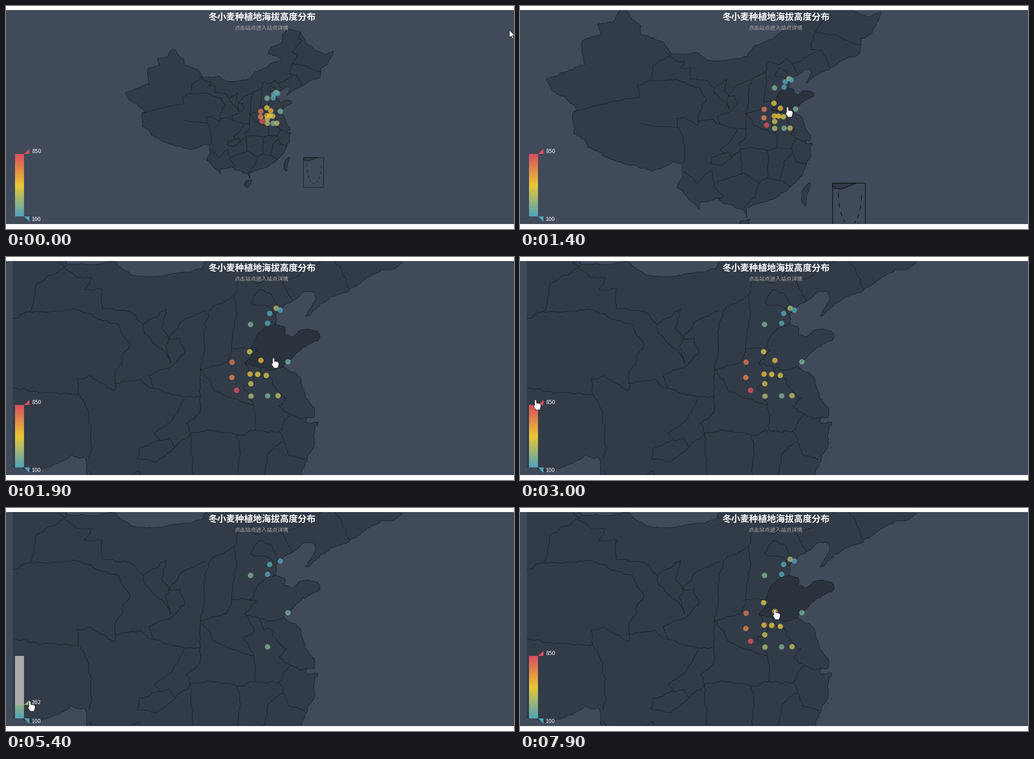
Recreate the animation shown at these times as a matplotlib script. Size 1128x496 px, loop 8 s.

```python
import numpy as np
import matplotlib.pyplot as plt
from matplotlib.animation import FuncAnimation
from matplotlib.collections import LineCollection
from matplotlib.patches import Polygon, Rectangle
from matplotlib.transforms import Affine2D

W, H, DPI = 1128, 496, 100
PX = 72 / DPI
STEP, FRAMES = 100, 80
BG, LAND, HOVER, EDGE = "#404a59", "#323c48", "#2a333d", "#11161c"
FONT = "Noto Sans CJK JP"
rng = np.random.default_rng(5)

# Each wheel notch zooms by 1.1 around the pointer: scale, x shift, y shift
FAR = (1.0, 0.0, 0.0)
HALF = (1.1 ** 2, -126.7, -51.0)
MID = (1.1 ** 5, -368.8, -148.3)
NEAR = (1.1 ** 11, -1111.5, -435.5)
VIEWS = np.array([FAR, HALF, MID, NEAR]).T


def place(view, coords):
    pts = np.reshape(np.array(coords, float), (-1, 2))
    return (pts - view[1:]) / view[0]


def rough(pts, depth=4, share=0.17, cap=1.1):
    """Split every segment again and again, nudging each middle sideways."""
    for _ in range(depth):
        d = np.diff(pts, axis=0)
        size = np.hypot(*d.T)[:, None]
        side = np.c_[-d[:, 1], d[:, 0]] / size
        push = np.minimum(share * size, cap) * rng.uniform(-1, 1, size.shape)
        out = np.empty((2 * len(pts) - 1, 2))
        out[::2], out[1::2] = pts, pts[:-1] + d / 2 + side * push
        pts = out
    return pts


lines = []


def border(view, *coords):
    lines.append(rough(place(view, coords)))
    return lines[-1]


# Outer edge, clockwise from the west
north = border(
    FAR, 265, 193, 283, 186, 318, 173, 314, 155, 315, 140, 341, 131, 336, 118, 357, 115,
    371, 95, 379, 103, 396, 120, 395, 131, 427, 142, 437, 158, 475, 157, 488, 167, 515, 167,
    541, 162, 552, 147, 577, 138, 594, 125, 612, 121, 611, 116, 581, 106, 590, 91, 612, 83,
    614, 63, 628, 51, 652, 56, 671, 86, 690, 100, 712, 107, 727, 101, 714, 130, 699, 138,
    697.5, 156)
bay = border(NEAR, 880, 11, 857, 28, 834, 27, 797, 50, 764, 71, 735, 84, 690, 113, 666, 131,
             688, 92, 684, 77, 660, 78, 598, 129, 598, 148)
sd_coast = border(NEAR, 598, 148, 618, 156, 619, 172, 634, 178, 658, 162, 697, 171, 694, 184,
                  660, 200, 617, 243)
js_coast = border(NEAR, 617, 243, 647, 263, 664, 312, 684, 334, 683, 357, 672, 356)
east = border(NEAR, 672, 356, 664, 366, 692, 367, 684, 392, 684, 420, 668, 455, 655, 487)
south = border(
    MID, 628, 373, 598, 405, 560, 431, 502, 449, 504, 470, 498, 456, 455, 440, 440, 428,
    400, 436, 398, 453, 378, 432, 349, 405, 362, 378, 357, 349, 340, 346, 312, 361, 290, 366,
    250, 354, 212, 345, 183, 330, 150, 313, 143, 297, 119, 283, 117, 240, 130, 232, 95, 200,
    72, 190, 59, 162)

# Provinces that react to the pointer
sd_west = border(NEAR, 598, 148, 572, 160, 540, 205, 557, 208, 530, 236, 563, 247)
sd_south = border(NEAR, 563, 247, 590, 252, 617, 243)
js_west = border(NEAR, 563, 247, 572, 271, 586, 268, 606, 300, 624, 314, 606, 332, 632, 350)
js_south = border(NEAR, 632, 350, 655, 360, 672, 356)

mainland = np.vstack([north, bay, sd_coast, js_coast, east, south])
shandong = np.vstack([sd_coast, sd_south[::-1], sd_west[::-1]])
jiangsu = np.vstack([js_coast, js_south[::-1], js_west[::-1], sd_south])

# West
border(FAR, 437, 159, 413, 174, 408, 195, 391, 202, 394, 218, 302, 238)
border(NEAR, 52, 122, 170, 122, 212, 140, 250, 150, 275, 195, 242, 262, 240, 298, 185, 264,
       158, 272, 160, 304, 132, 302, 75, 304, 15, 290)
border(NEAR, 160, 304, 184, 350, 190, 430, 184, 448)
border(NEAR, 118, 10, 160, 46, 190, 46, 175, 72, 215, 72, 213, 114, 275, 120, 304, 150, 357, 116,
       345, 158, 362, 182, 392, 142, 446, 120)
border(NEAR, 304, 150, 307, 172, 357, 218, 365, 236, 354, 196, 362, 182, 386, 180, 396, 215,
       358, 248, 318, 264, 328, 292)
border(NEAR, 240, 280, 300, 272, 328, 292, 375, 306, 431, 312, 432, 249)

# Centre
border(NEAR, 634, 100, 612, 56, 592, 31, 566, 57, 520, 46, 508, 86, 456, 115, 441, 150, 441, 200,
       432, 249, 488, 236, 500, 204, 540, 205)
border(NEAR, 500, 204, 512, 130, 508, 86)
border(NEAR, 598, 129, 582, 110, 543, 102, 566, 72, 590, 83, 606, 120)
border(NEAR, 530, 236, 552, 274, 526, 290, 550, 328, 554, 386, 606, 388, 632, 350)
border(NEAR, 432, 249, 460, 292, 500, 314, 550, 328)
border(NEAR, 606, 388, 626, 438, 664, 450)
border(NEAR, 614, 412, 580, 445, 564, 515)
border(NEAR, 410, 392, 456, 386, 514, 396, 554, 386)
border(NEAR, 514, 396, 520, 434, 514, 504)
border(NEAR, 431, 312, 430, 346, 400, 370, 410, 392, 416, 450, 416, 487)
border(NEAR, 396, 316, 372, 358, 328, 392, 342, 408, 362, 402, 376, 422, 410, 392)
border(NEAR, 342, 408, 300, 422, 290, 448, 334, 456, 376, 422)

# South and north-east
border(MID, 363, 366, 392, 394, 424, 366, 430, 402, 452, 424, 441, 428)
border(MID, 435, 394, 493, 372, 532, 394, 550, 382, 577, 388, 602, 402)
border(MID, 532, 394, 524, 418, 496, 450)
border(FAR, 655, 57, 648, 72, 658, 77, 635, 103, 648, 108, 636, 128, 661, 131, 684, 142, 698, 146)
border(FAR, 636, 128, 630, 152, 645, 153, 657, 177.5)
border(NEAR, 614, 56, 640, 46, 706, 8)

# Islands, with specks scattered off the east coast
hainan = border(FAR, 528, 398, 533, 389, 546, 387, 536, 405, 528, 398)
taiwan = border(FAR, 620, 344, 629, 336, 622, 368, 617, 358, 620, 344)
for x, y in rng.choice(east, 7) + rng.uniform(0.5, 3, (7, 2)):
    lines.append(np.array([(x, y), (x + 0.7, y + 0.4)]))

# Inset: frame, strip of land and dashes along a bowl
corner = place(FAR, (660, 337, 692, 337, 672, 345, 663, 344, 660, 340))
frame = place(FAR, (660, 337, 705, 337, 705, 403, 660, 403, 660, 337))
turn = np.linspace(0, np.pi, 40)
bowl = np.c_[684 - 16 * np.cos(turn), 350 + 45 * np.sin(turn)]
dashes = [bowl[k:k + 3] for k in range(0, 38, 4)]

# Stations: x, y in the nearest view, altitude
stations = np.array([
    (543, 150, 215), (600, 114, 320), (609, 118, 110), (585.5, 125.5, 110),
    (581, 147.5, 115), (541, 210.5, 430), (566, 230, 540), (626, 233, 190),
    (502, 234, 735), (501.5, 268, 685), (542, 260.5, 530), (559, 261, 470),
    (578, 263.5, 430), (543.5, 282, 395), (512, 296.5, 845), (544, 309.5, 325),
    (581, 309, 215), (604, 308.5, 360)])
spots, altitude = place(NEAR, stations[:, :2]), stations[:, 2]

LOW, HIGH, BAR_TOP, BAR_END = 100, 850, 329, 468
STOPS = np.array([(80, 163, 186), (234, 199, 54), (217, 78, 93)]) / 255


def tint(value):
    return np.stack([np.interp(value, (LOW, (LOW + HIGH) / 2, HIGH), c) for c in STOPS.T], -1)


def keys(*rows):
    """Function of time that runs straight between (time, values...) rows."""
    cols = np.array(rows).T
    return lambda t: [np.interp(t, cols[0], c) for c in cols[1:]]


notches = keys((800, 0), (1000, 2), (1100, 2), (1600, 7), (1700, 7), (1900, 11))
slider = keys((4800, 329), (4900, 425), (5400, 438), (5900, 387), (6400, 353.8), (7000, 329))
path = keys((0, 1118, 54), (800, 603, 243), (1000, 603, 243), (1100, 594, 225),
            (1900, 594, 225), (2200, 140, 298), (2300, 140, 298), (2700, 10, 312),
            (3200, 51, 322), (3700, 53, 321), (3900, 172, 442), (4100, 172, 442),
            (4300, 39, 388), (4400, 39, 388), (4700, 53, 321), (7200, 53, 321),
            (7900, 566, 226))

HAND = np.array([(-2, 1), (0, -1), (2, 1), (2, 7), (9, 8), (12, 11), (11, 17), (9, 22),
                 (1, 22), (-5, 13), (-2, 12)])
ARROW = np.array([(0, 0), (0, 16), (4, 12.5), (6.5, 18.5), (9, 17.5), (6.5, 11.5), (11.5, 11.5)])
ARM = np.array([(-1.5, -1.5), (-1.5, -6), (-4, -6), (0, -10), (4, -6), (1.5, -6)])
QUARTER = np.array([(0, 1), (-1, 0)])
CROSS = np.vstack([ARM @ np.linalg.matrix_power(QUARTER, k) for k in range(4)])

fig = plt.figure(figsize=(W / DPI, H / DPI), dpi=DPI, facecolor="white")
ax = fig.add_axes([0, 0, 1, 1])
ax.axis("off")
view = Affine2D()
on_map = view + ax.transData


def rect(x, y, w, h, color, z):
    return ax.add_patch(Rectangle((x, y), w, h, fc=color, lw=0, zorder=z))


def shape(pts, color, z, lw=0, **kw):
    return ax.add_patch(Polygon(pts, closed=True, fc=color, zorder=z, lw=lw, **kw))


def strokes(parts, width):
    art = LineCollection(parts, colors=EDGE, linewidths=width * PX, zorder=3, transform=on_map)
    return ax.add_collection(art, autolim=False)


def label(x, y, text, px, color="white", **kw):
    return ax.text(x, y, text, size=px * PX, color=color, family=FONT, va="center_baseline",
                   zorder=8, **kw)


rect(0, 9, W, 476, BG, 0)
for land in (mainland, hainan, taiwan, corner):
    shape(land, LAND, 1, transform=on_map)
sd_hover = shape(shandong, HOVER, 2, transform=on_map)
js_hover = shape(jiangsu, HOVER, 2, transform=on_map)
strokes(lines, 0.85)
inset = strokes([frame, corner, *dashes], 1)
dots = ax.scatter(*spots.T, s=(12 * PX) ** 2, lw=0, zorder=4)

# Page margins hide the overflow of the map
rect(0, 9, 15, 476, BG, 5)
rect(0, 0, W, 9, "white", 5)
rect(0, 485, W, 11, "white", 5)

label(569, 22, "冬小麦种植地海拔高度分布", 19.9, ha="center", weight="bold")
label(567.5, 47.5, "点击站点进入站点详情", 12, "#aaaaaa", ha="center")

ramp = tint(np.linspace(HIGH, LOW, BAR_END - BAR_TOP))[:, None]
ax.imshow(ramp, extent=(20, 40, BAR_END, BAR_TOP), aspect="auto", interpolation="nearest",
          zorder=6)
ax.set(xlim=(0, W), ylim=(H, 0))
unused = rect(20, BAR_TOP, 20, 0, "#aaaaaa", 7)
shape([(40, 468), (51.5, 468), (51.5, 480)], tint(LOW), 7)
top_mark = shape([(40, 329), (51.5, 329), (51.5, 317.5)], tint(HIGH), 7)
label(57, 473, "100", 12.6)
top_text = label(57, 322, "850", 12.6)
pointer = shape(HAND, "white", 10, lw=0.9 * PX, ec="#222222")


def pointer_at(t, top):
    x, y = path(t)
    y += top - BAR_TOP
    if x > 735:
        form = ARROW
    elif 20 < x < 40 and BAR_TOP < y < BAR_END:
        form = CROSS
    else:
        form = HAND
    return form + (x, y)


def draw(i):
    t = i * STEP
    scale = 1.1 ** notches(t)[0]
    shift = [np.interp(scale, VIEWS[0], row) for row in VIEWS[1:]]
    view.clear().scale(scale).translate(*shift)
    inset.set_linewidth(scale * PX)
    sd_hover.set_visible(1100 <= t <= 1900 or t >= 7800)
    js_hover.set_visible(900 <= t <= 1000)

    top = slider(t)[0]
    limit = HIGH - (top - BAR_TOP) * (HIGH - LOW) / (BAR_END - BAR_TOP)
    dots.set_offsets(spots * scale + shift)
    dots.set_facecolors(np.c_[tint(altitude), np.where(altitude <= limit, 0.8, 0)])

    unused.set_height(top - BAR_TOP)
    top_mark.set_xy([(40, top), (51.5, top), (51.5, top - 11.5)])
    top_mark.set_facecolor(tint(limit))
    top_text.set_text(f"{limit:.0f}")
    top_text.set_y(top - 7)
    pointer.set_xy(pointer_at(t, top))
    return []


anim = FuncAnimation(fig, draw, frames=FRAMES, interval=STEP, repeat=True, repeat_delay=0)
plt.show()
```
